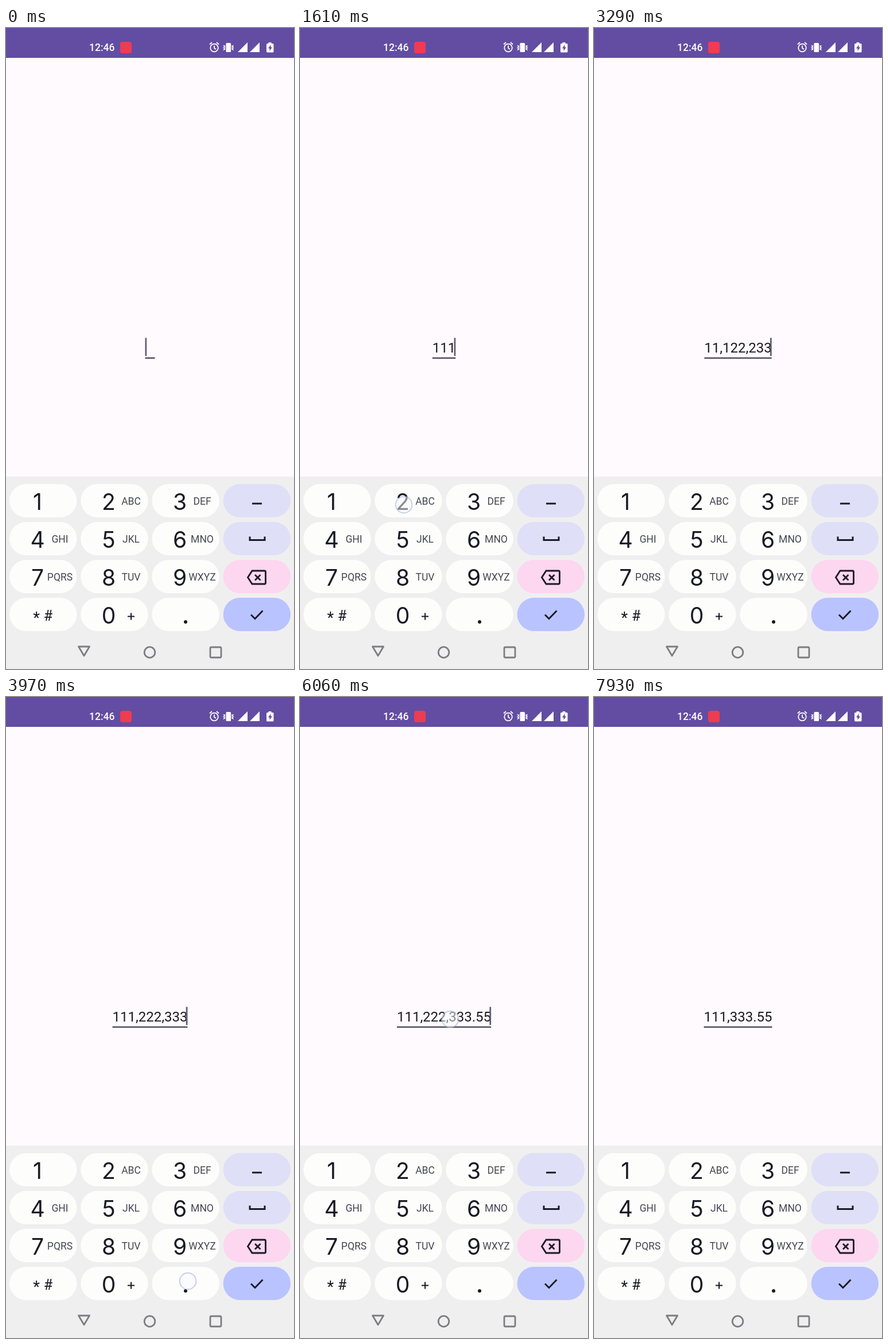
Recreate the animation shown at these times as an HTML page with a canvas. Size 502 px wide and 1116 px high, loop 8 s.

```html
<!DOCTYPE html>
<html>
<head>
<meta charset="utf-8">
<title>Number input</title>
<style>
  html, body { margin: 0; width: 100%; height: 100%; overflow: hidden; background: #fefafd; }
  canvas { display: block; width: 502px; height: 1116px; }
</style>
</head>
<body>
<canvas id="stage" width="502" height="1116"></canvas>
<script>
const ctx = document.getElementById('stage').getContext('2d');
const LOOP = 8000, BLINK = 500, PRESS_DELAY = 25, FADE = 200;
const INK = '#191a23', ACCENT = '#625b71', DIGITS = 'Inter, sans-serif', LABELS = 'Roboto, sans-serif';

// Each tap: down, up, x, y, key index (-1: the field), text after it, characters right of the caret
const taps = [
  [230, 360, 62, 828, 0, '1', 0],
  [660, 770, 61, 829, 0, '11', 0],
  [1130, 1240, 62, 828, 0, '111', 0],
  [1608, 1715, 181, 830, 1, '1,112', 0],
  [1900, 2010, 181, 830, 1, '11,122', 0],
  [2190, 2300, 181, 830, 1, '111,222', 0],
  [2560, 2690, 329, 828, 2, '1,112,223', 0],
  [2950, 3070, 329, 828, 2, '11,122,233', 0],
  [3460, 3580, 328, 828, 2, '111,222,333', 0],
  [3968, 4080, 317, 1017, 14, '111,222,333.', 0],
  [4280, 4390, 190, 894, 5, '111,222,333.5', 0],
  [4580, 4690, 190, 894, 5, '111,222,333.55', 0],
  [5945, 6110, 262, 561, -1, '111,222,333.55', 6],
  [6845, 7020, 445, 966, 11, '11,122,333.55', 7],
  [7115, 7225, 445, 966, 11, '1,112,333.55', 7],
  [7320, 7430, 445, 966, 11, '111,333.55', 7],
].map(([down, up, x, y, key, text, right]) => ({ down, up, x, y, key, text, right }));

const labels = ['1', '2 ABC', '3 DEF', '', '4 GHI', '5 JKL', '6 MNO', '',
  '7 PQRS', '8 TUV', '9 WXYZ', '', '', '0 +', '', ''];
const sideColors = ['#dfe0f7', '#dfe0f7', '#fdd6f0', '#b9c3ff'];

function text(s, x, y, font, color, align = 'center') {
  ctx.font = font;
  ctx.fillStyle = color;
  ctx.textAlign = align;
  ctx.fillText(s, x, y);
}
function line(d, color, width) {
  ctx.strokeStyle = color;
  ctx.lineWidth = width;
  ctx.stroke(new Path2D(d));
}
function shape(d, color) {
  ctx.fillStyle = color;
  ctx.fill(new Path2D(d), 'evenodd');
}
function rect(x, y, w, h, color, r = 0) {
  ctx.fillStyle = color;
  ctx.beginPath();
  ctx.roundRect(x, y, w, h, r);
  ctx.fill();
}
function circle(x, y, r) {
  ctx.beginPath();
  ctx.arc(x, y, r, 0, 7);
}

function statusBar() {
  rect(0, 0, 502, 52, '#624da3');
  text('12:46', 145, 40, '500 17.5px ' + LABELS, '#fff', 'left');
  rect(199, 24, 20, 20, '#ee3c50', 4);
  const w = '#fff';
  ctx.strokeStyle = w;
  ctx.lineWidth = 1.8;
  circle(363, 34.5, 6.8);
  ctx.stroke();
  line('M363 30.5V35l3 2M355 28.5l4-3.5M371 28.5l-4-3.5', w, 1.8);
  rect(383.5, 26, 8.5, 16, w, 1.5);
  line('M381.5 30v8M394 30v8M379 30l1.5 2.5-1.5 2 1.5 2-1.5 2.5M396.5 30l-1.5 2.5 1.5 2-1.5 2 1.5 2.5', w, 1.2);
  shape('M421 25v17h-17zM442 25v17h-17z', w);
  shape('M457.5 25h5v2H465q1.5 0 1.5 1.5v12.500q0 1.500-1.500 1.500h-9.500q-1.500 0-1.500-1.500v-12.500q0-1.500 1.500-1.500h2zM461.500 29l-4.500 6.500h2.500v4.500l4.500-6.500h-2.500z', w);
}

function pressLevel(key, t) {
  let level = 0;
  for (const p of taps) {
    if (p.key !== key || t < p.down + PRESS_DELAY) continue;
    level = Math.max(0, Math.min(1, 1 - (t - p.up) / FADE));
  }
  return level;
}

function keyboard(t) {
  rect(0, 781, 502, 335, '#f0eff0');
  for (let i = 0; i < 16; i++) {
    const col = i % 4, row = i >> 2;
    const x = 6 + col * 124.2, y = 794 + row * 66, level = pressLevel(i, t);
    rect(x, y, 117.5, 58, col === 3 ? sideColors[row] : '#fdfdfc', 29);
    if (level) {
      ctx.globalAlpha = level;
      rect(x, y, 117.5, 58, i === 11 ? '#4c5794' : '#e0dfe8', 29);
      ctx.globalAlpha = 1;
    }
    const [digit, sub] = labels[i].split(' ');
    if (digit) text(digit, 55 + col * 124, y + 45, '400 39px ' + DIGITS, INK);
    if (sub === '+') line('M212 1024.500h12M218 1018.500v12', INK, 2);
    else if (sub) text(sub, 94 + col * 124, y + 36, '17.5px ' + LABELS, '#45464f');
  }
  text('*', 53, 1036, '27px ' + LABELS, INK);
  text('#', 73.5, 1032, '25px ' + LABELS, INK);
  circle(313, 1034, 3);
  ctx.fillStyle = INK;
  ctx.fill();

  line('M429 828h17', INK, 3);
  line('M425 885.500v6h26v-6', INK, 3);
  const erase = pressLevel(11, t) > .4 ? '#dfe0f8' : INK;
  line('M421.500 956.500l7.500-11.500h21.500q2 0 2 2v19q0 2-2 2H429zM434 952l9.500 9.500M443.500 952l-9.500 9.500', erase, 2.8);
  line('M427 1021.500l7 7 13.500-14', INK, 2.8);

  const nav = '#7d7d81';
  ctx.lineJoin = 'round';
  line('M126.500 1077h19l-9.500 16z', nav, 2.8);
  line('M358 1078h15q2 0 2 2v14q0 2-2 2h-15q-2 0-2-2v-14q0-2 2-2z', nav, 2.8);
  circle(250.5, 1087, 9.3);
  ctx.stroke();
  ctx.lineJoin = 'miter';
}

function field(t) {
  const last = taps.findLast(p => t >= p.up) || { up: 0, text: '', right: 0, key: 0 };
  const font = '24px ' + LABELS;
  ctx.font = font;
  const width = Math.max(17, ctx.measureText(last.text).width);
  const left = 251 - width / 2;
  const before = last.text.slice(0, last.text.length - last.right);
  const caret = left + ctx.measureText(before).width;
  rect(left, 573.2, width, 2.8, ACCENT);
  text(last.text, left, 565, font, '#1c1b1f', 'left');
  if ((t - last.up) % (2 * BLINK) < BLINK) {
    rect(Math.min(caret, left + width - 2.7), 539.5, 2.7, 31.5, ACCENT);
  }
  if (last.key < 0) {
    shape(`M${caret + .4} 571.200l9.200 9.200a13 13 0 1 1-18.400 0z`, ACCENT);
  }
}

function touch(t) {
  const p = taps.find(p => t >= p.down && t < p.up);
  if (!p) return;
  circle(p.x, p.y, 14.3);
  ctx.fillStyle = 'rgba(250,250,252,.5)';
  ctx.fill();
  ctx.strokeStyle = 'rgba(165,178,215,.6)';
  ctx.lineWidth = 2;
  ctx.stroke();
}

function draw(now) {
  const t = now % LOOP;
  rect(0, 0, 502, 1116, '#fefafd');
  statusBar();
  keyboard(t);
  field(t);
  touch(t);
}

const start = performance.now();
function frame() {
  draw(performance.now() - start);
  requestAnimationFrame(frame);
}
frame();
</script>
</body>
</html>
```
